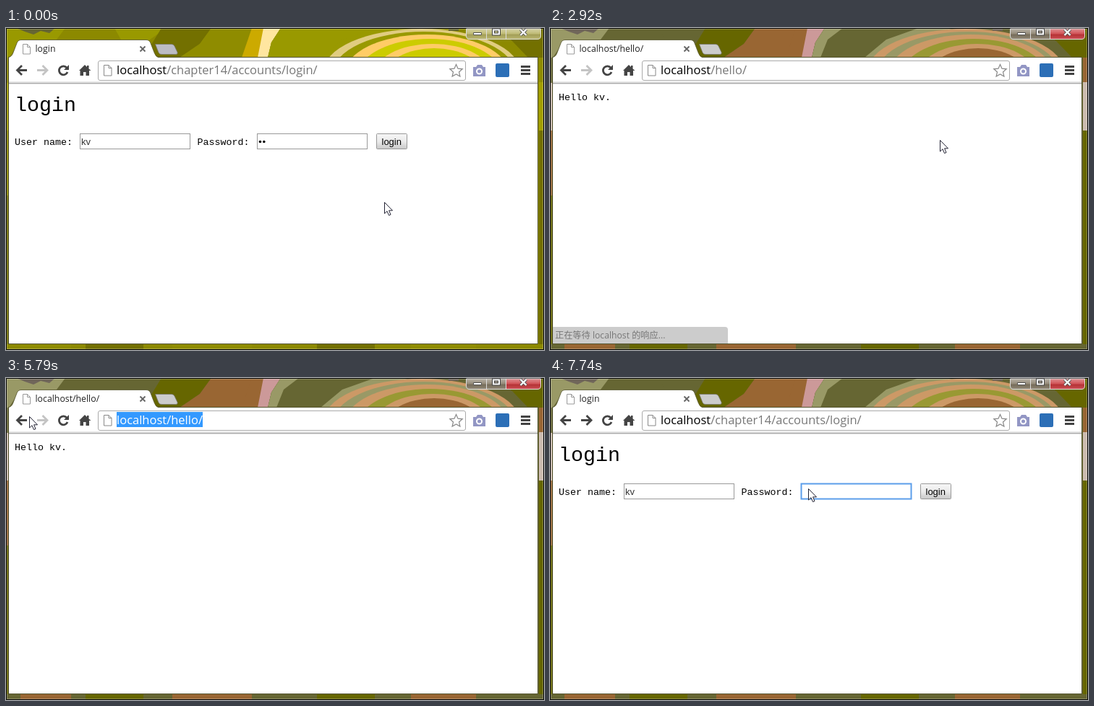
An HTML page that plays this animation: 744 by 446 pixels, repeating every 8000 ms.

```html
<!DOCTYPE html>
<html lang="en">
<head>
<meta charset="utf-8">
<title>login</title>
<style>
html, body { margin: 0; width: 100%; height: 100%; overflow: hidden; }
svg { display: block; width: 744px; height: 446px; --base: #666633; --light: #999966; --deep: #666600; --brown: #996633;
  --pink: #cc9999; --glow: #996633; --rim: #cc9966; --tan: #cc9966; --ring: #999933; --core: #996633; --mid: #666633;
  --ctl: #837864; --close: #c9383c; --side: #ccbcb0; --spot: #70665a; --tab: #cccccc; }
svg.idle { --base: #8c8900; --light: #999900; --deep: #737000; --brown: #8f8c00;
  --pink: #ffe6a0; --glow: #ccaa00; --rim: #e0cc80; --tan: #ffcc66; --ring: #cccc00; --core: #cccc00; --mid: #999900;
  --ctl: #b5b060; --close: #b5b060; --side: #a39f00; --spot: #666633; --tab: #bcbcc4; }
text { white-space: pre; }
.ui { font-family: "Open Sans", "Noto Sans CJK SC", "Noto Sans CJK", sans-serif; }
.mono { font: 13.33px "Liberation Mono", monospace; }
.form { font: 13px "Liberation Sans", sans-serif; }
.line { fill: none; stroke: #444; stroke-width: 2.8; }
.field { fill: #fff; stroke: #999; }
.field.focus { stroke: #5b9dea; stroke-width: 2; }
</style>
</head>
<body>
<svg id="stage" viewBox="0 0 744 446">
  <defs>
    <linearGradient id="btn" x2="0" y2="1"><stop stop-color="#f6f6f6"/><stop offset=".5" stop-color="#ebebeb"/><stop offset="1" stop-color="#c8c8c8"/></linearGradient>
    <linearGradient id="shine" x2="0" y2="1"><stop stop-color="#fff" stop-opacity=".45"/><stop offset=".5" stop-color="#fff" stop-opacity=".12"/><stop offset=".55" stop-opacity=".1"/><stop offset="1" stop-color="#fff" stop-opacity=".15"/></linearGradient>
    <clipPath id="top"><path d="M0 0H744V41H0z"/></clipPath>
  </defs>

  <!-- wallpaper seen through the window frame -->
  <rect width="744" height="446" fill="var(--base)"/>
  <g clip-path="url(#top)">
    <path d="M0 0H82L70 16H20L4 41H0z" fill="var(--light)"/>
    <path d="M14 0H68L60 7L48 4L38 9L26 5z" fill="var(--spot)"/>
    <path d="M150 0H222L196 18H160z" fill="var(--mid)"/>
    <path d="M215 0H284L268 22L240 41H190z" fill="var(--deep)"/>
    <path d="M284 0H354V41H240L268 22z" fill="var(--brown)"/>
    <path d="M340 0H358L350 41H326z" fill="var(--glow)"/>
    <path d="M356 0H380L367 20L362 41H348z" fill="var(--pink)"/>
    <path d="M380 0H530L480 12L450 41H362L367 20z" fill="var(--mid)"/>
    <path d="M380 0H405L384 16L374 41H362L367 20z" fill="var(--light)"/>
    <path d="M510 0H560L500 14L462 41H435L465 16z" fill="var(--light)"/>
    <ellipse cx="575" cy="62" rx="137" ry="61" fill="var(--rim)"/>
    <ellipse cx="578" cy="63" rx="126" ry="58" fill="var(--light)"/>
    <ellipse cx="582" cy="64" rx="114" ry="55" fill="var(--tan)"/>
    <ellipse cx="586" cy="65" rx="99" ry="50" fill="var(--ring)"/>
    <ellipse cx="590" cy="66" rx="82" ry="44" fill="var(--tan)"/>
    <ellipse cx="592" cy="66" rx="68" ry="38" fill="var(--core)"/>
    <path d="M680 0H744V41H722L700 18z" fill="var(--deep)"/>
    <path d="M612 0H626V4H612z" fill="var(--spot)"/>
  </g>
  <path d="M737 41h6v34h-6zM0 142h4v90H0zM20 438h70v7H20zM230 438h110v7H230zM560 438h90v7h-90z" fill="var(--brown)"/>
  <path d="M737 75h6v67h-6zM0 76h4v66H0z" fill="var(--side)"/>
  <path d="M737 142h6v296h-6zM0 232h4v206H0zM110 438h80v7h-80zM430 438h80v7h-80z" fill="var(--deep)"/>
  <path d="M1.5 444.5V1.5H742.5V444.5z" fill="none" stroke="#fff" opacity=".25"/>
  <path d="M.5 .5H743.5V445.5H.5z" fill="none" stroke="#000"/>

  <!-- window buttons -->
  <path d="M636.5 1V11Q636.5 15.5 641 15.5H692V1z" fill="var(--ctl)"/>
  <path d="M692 1V15.5H735Q739.5 15.5 739.5 11V1z" fill="var(--close)"/>
  <path d="M636.5 1V11Q636.5 15.5 641 15.5H735Q739.5 15.5 739.5 11V1z" fill="url(#shine)" stroke="#ddd"/>
  <path d="M664.5 1V15M691.5 1V15" stroke="#ddd"/>
  <path d="M646.5 6.5h11v3h-11z" fill="#fff" stroke="#555"/>
  <path d="M674 2.5h8v6h-8z" fill="none" stroke="#444" stroke-width="4"/>
  <path d="M674 2.5h8v6h-8z" fill="none" stroke="#fff" stroke-width="2"/>
  <path d="M711.5 2l8 8m0-8l-8 8" stroke="#555" stroke-width="4"/>
  <path d="M711.5 2l8 8m0-8l-8 8" stroke="#fff" stroke-width="2.4"/>

  <!-- tab strip, toolbar and page -->
  <path d="M206.5 22.5H229Q232 22.5 233 25L237 33.5Q238 36.5 235 36.5H215Q212 36.5 211 34z" fill="var(--tab)" stroke="#777" stroke-opacity=".7"/>
  <rect x="3.5" y="40.5" width="732" height="397" fill="#fff" stroke="#55552f"/>
  <path d="M4 74H735V76H4z" fill="#e4e4e4"/>
  <path d="M4 76H735V77H4z" fill="#aaa"/>
  <path d="M4 77H735V78H4z" fill="#ddd"/>
  <path d="M3 41Q8 40 10 34L15 21Q16.5 16.5 21 16.5H194Q198.5 16.5 200 21L205 34Q207 40 211 41z" fill="#fff"/>
  <path d="M3 40.5Q8 40 10 34L15 21Q16.5 16.5 21 16.5H194Q198.5 16.5 200 21L205 34Q207 40 211 40.5" fill="none" stroke="#55552f" stroke-opacity=".8"/>
  <path id="tabIcon" d="M23.5 22.5h6l4 4v9.5h-10zM29.5 22.5v4h4" fill="#fff" stroke="#999"/>
  <path id="spinner" d="M28 23.5a6 6 0 1 1 -6 6" fill="none" stroke="#999" stroke-width="2"/>
  <text id="title" class="ui" x="40.5" y="33" font-size="12.3" fill="#222"></text>
  <path d="M185.5 25.5l7 7m0-7l-7 7" stroke="#666" stroke-width="1.9"/>

  <path class="line" d="M22 52l-6.5 6.5l6.5 6.5M16 58.5H29"/>
  <path id="forward" class="line" d="M50.5 52l6.5 6.5l-6.5 6.5M56.5 58.5H43"/>
  <path class="line" d="M84 55A6 6 0 1 0 85 61"/>
  <path d="M87 51v7h-7zM101 59l8-8l3 3v-2h2.5v4.5l3 2.5h-2.5v7h-4.5v-5h-3.5v5h-4.5v-7z" fill="#444"/>
  <rect x="127.5" y="45.5" width="508" height="27" rx="2.5" fill="#fff" stroke="#aaa"/>
  <path d="M135.5 51.5h6.5l4 4v10.5h-10.5zM142 51.5v4h4" fill="#fff" stroke="#888"/>
  <path d="M622.5 50.5l2.5 5.7l6.2 .6l-4.7 4.2l1.4 6.1l-5.4-3.2l-5.4 3.2l1.4-6.1l-4.7-4.2l6.2-.6z" fill="#fff" stroke="#888" stroke-width="1.2"/>
  <path d="M646 54h4l2-3h6l2 3h3v13h-17z" fill="#9296c4"/>
  <circle cx="654.5" cy="60" r="3.5" fill="#9296c4" stroke="#fff" stroke-width="2"/>
  <rect x="677" y="49" width="19" height="19" rx="2" fill="#2c6fb7"/>
  <path class="line" d="M712 53.5h13M712 58.5h13M712 63.5h13"/>
  <rect id="marked" x="153" y="47" width="119" height="21" fill="#39f"/>
  <text class="ui" x="153" y="64" font-size="16.5"><tspan id="host">localhost</tspan><tspan id="path"></tspan></text>
  <path id="caret" d="M.5 47V68" stroke="#000"/>

  <g id="login">
    <text class="mono" x="12" y="115" style="font-size:28.3px">login</text>
    <text class="mono" x="12" y="162">User name:</text>
    <text class="mono" x="264.5" y="162">Password:</text>
    <rect id="user" class="field" x="102.5" y="146.5" width="152" height="21"/>
    <text class="form" x="104" y="162" fill="#333">kv</text>
    <rect id="pass" class="field" x="347.5" y="146.5" width="152" height="21"/>
    <g id="dots"><circle cx="351.5" cy="157.5" r="1.8"/><circle cx="356.8" cy="157.5" r="1.8"/></g>
    <rect id="button" x="512.5" y="146.5" width="42" height="21" rx="1" fill="url(#btn)"/>
    <text class="form" x="519.5" y="162">login</text>
  </g>
  <text id="hello" class="mono" x="12" y="100">Hello kv.</text>
  <path id="bubble" d="M4 414H242Q246 414 246 418V437H4z" fill="#ccc"/>
  <text id="status" class="ui" x="7" y="430" font-size="12.2">正在等待 localhost 的响应...</text>

  <path id="cursor" d="M.5 .5V16L4 12.7L6.5 18.5L9 17.5L6.6 11.8H11.5z" fill="#fff" stroke="#223" stroke-linejoin="round"/>
</svg>
<script>
const el = id => document.getElementById(id);
const show = (id, on) => el(id).setAttribute("visibility", on ? "visible" : "hidden");
const set = (id, name, value) => el(id).setAttribute(name, value);

// time, x, y of the pointer
const route = [
  [0, 523, 241], [99, 523, 241], [100, 516, 236], [1080, 516, 236], [1400, 430, 160],
  [1830, 430, 160], [2110, 539, 155], [3270, 539, 155], [3380, 473, 137],
  [3810, 473, 137], [3970, 209, 54], [4110, 209, 54], [4200, 250, 63], [4280, 250, 63], [4320, 252, 61],
  [4460, 252, 61], [4620, 226, 56], [5429, 226, 56], [5430, 193, 58],
  [5600, 193, 58], [5770, 32, 53], [6160, 32, 53], [6260, 304, 119], [6320, 304, 119],
  [6600, 190, 160], [6900, 158, 150], [7009, 158, 150], [7010, 150, 150],
  [7320, 150, 150], [7510, 357, 153], [8000, 357, 153]
];

function pointer(t) {
  const i = route.findIndex(k => k[0] > t);
  const [t0, x0, y0] = route[i - 1], [t1, x1, y1] = route[i];
  const f = (t - t0) / (t1 - t0);
  return [x0 + (x1 - x0) * f, y0 + (y1 - y0) * f].map(Math.round);
}

function draw(now) {
  const t = now % 8000;
  const within = (a, b) => t >= a && t < b;
  const selected = within(5010, 5960);
  const helloUrl = within(2530, 5960), helloPage = within(2560, 6160);
  const loading = within(2280, 2530);
  const clicked = within(4760, 5010), typedEnd = within(5960, 6900);

  el("stage").classList.toggle("idle", t < 1410);
  el("title").textContent = helloUrl ? "localhost/hello/" : "login";
  el("path").textContent = helloUrl ? "/hello/" : "/chapter14/accounts/login/";
  set("host", "fill", selected ? "#fff" : "#000");
  set("path", "fill", selected ? "#fff" : "#777");
  show("marked", selected);
  show("caret", clicked || typedEnd);
  set("caret", "transform", `translate(${clicked ? 228 : 431})`);
  set("forward", "style", `stroke:${t < 5960 ? "#c4c4c4" : "#444"}`);
  show("tabIcon", !loading);
  show("spinner", loading);
  set("spinner", "transform", `rotate(${-t * .5} 28 29.5)`);

  el("login").style.display = helloPage ? "none" : "";
  show("hello", helloPage);
  el("dots").style.display = t < 2560 ? "" : "none";
  el("user").classList.toggle("focus", within(6900, 7680));
  el("pass").classList.toggle("focus", within(1410, 2250) || t >= 7680);
  set("button", "stroke", within(2080, 2560) ? "#666" : "#999");
  set("button", "fill", within(2200, 2320) ? "#ddd" : "url(#btn)");

  show("bubble", within(2560, 2960));
  show("status", within(2560, 3290));
  set("status", "fill", t < 2960 ? "#777" : "#ddd");
  set("cursor", "transform", `translate(${pointer(t)})`);
  requestAnimationFrame(draw);
}
requestAnimationFrame(draw);
</script>
</body>
</html>
```
